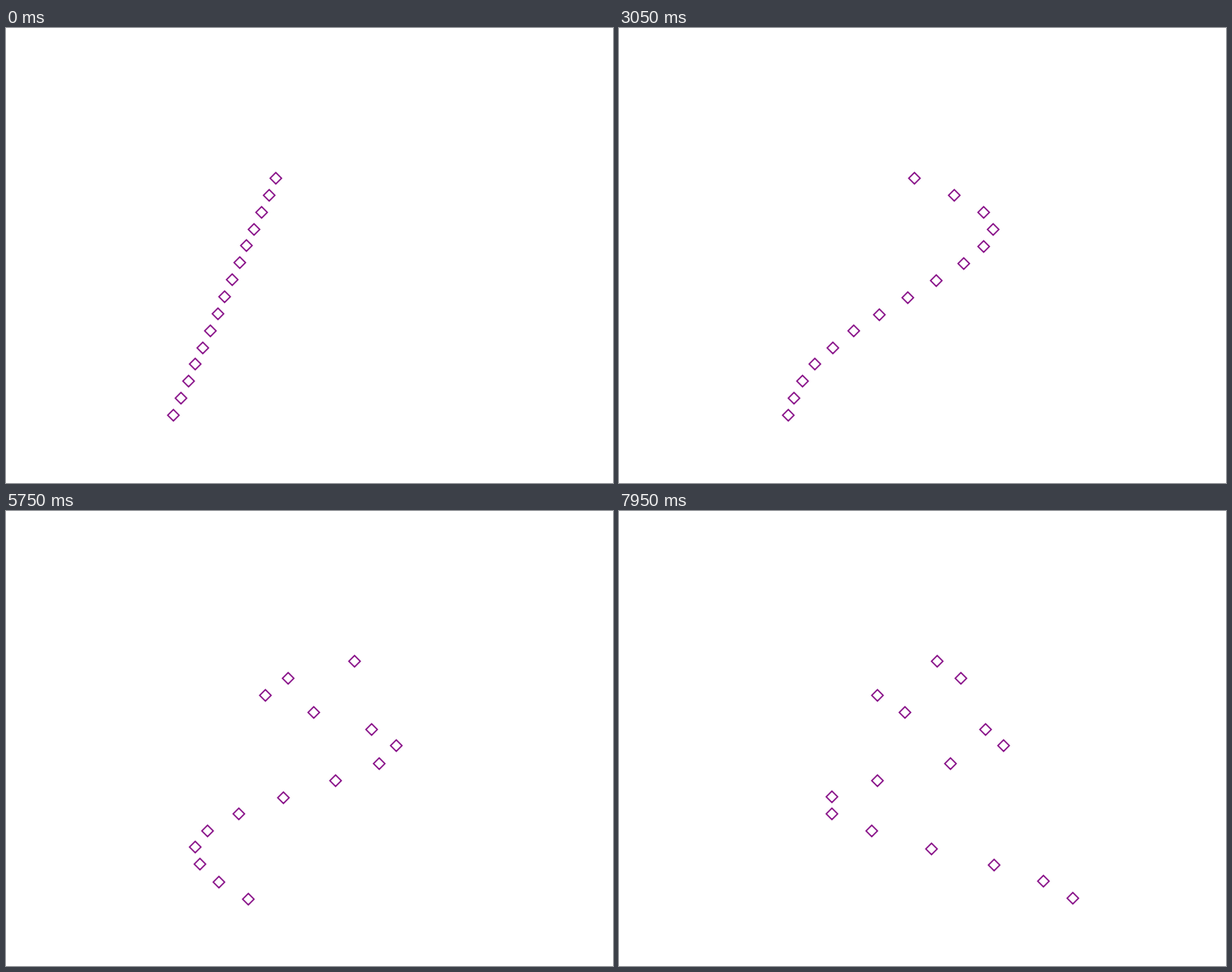
Recreate the animation shown at these times as an HTML page with a canvas. Size 640 by 480 pixels, loop 8 s.

```html
<!DOCTYPE html>
<html lang="en">
<head>
<meta charset="utf-8">
<title>Pendulum wave</title>
<style>
  html, body { margin: 0; width: 100%; height: 100%; overflow: hidden; background: #fff; }
  canvas { display: block; }
</style>
</head>
<body>
<canvas id="stage" width="640" height="480"></canvas>
<script>
const ctx = document.getElementById('stage').getContext('2d');
const LOOP = 8000, STEP = 50, COUNT = 15;
const GRAVITY = 9.81, START_ANGLE = 5 * Math.PI / 180;
const PIVOT = { x: 328, y: 57.6 };
const HALF = 6;

function bobAt(i, t) {
  const omega = Math.sqrt(GRAVITY / (0.7027 + 0.125 * i)) * 0.9996;
  // The swing widens slightly with time, as in a forward Euler integration.
  const swing = Math.exp(omega * omega * 0.00025 * t) * Math.cos(omega * t);
  return {
    x: PIVOT.x - (43.62 + 7.725 * i) * swing,
    y: PIVOT.y + 17.914 * (5.63 + i) * Math.cos(START_ANGLE * swing)
  };
}

function drawDiamond({ x, y }) {
  const cx = Math.round(x) + 0.5, cy = Math.round(y) + 0.5;
  ctx.beginPath();
  ctx.moveTo(cx, cy - HALF);
  ctx.lineTo(cx + HALF, cy);
  ctx.lineTo(cx, cy + HALF);
  ctx.lineTo(cx - HALF, cy);
  ctx.closePath();
  ctx.stroke();
}

function draw(ms) {
  const t = Math.floor((ms % LOOP) / STEP) * STEP / 1000;
  ctx.fillStyle = '#fff';
  ctx.fillRect(0, 0, 640, 480);
  ctx.strokeStyle = '#800080';
  ctx.lineWidth = 100 / 72;
  for (let i = 0; i < COUNT; i++) drawDiamond(bobAt(i, t));
}

let start;
function tick(now) {
  start ??= now;
  draw(Math.max(0, now - start));
  requestAnimationFrame(tick);
}
draw(0);
requestAnimationFrame(tick);
</script>
</body>
</html>
```
